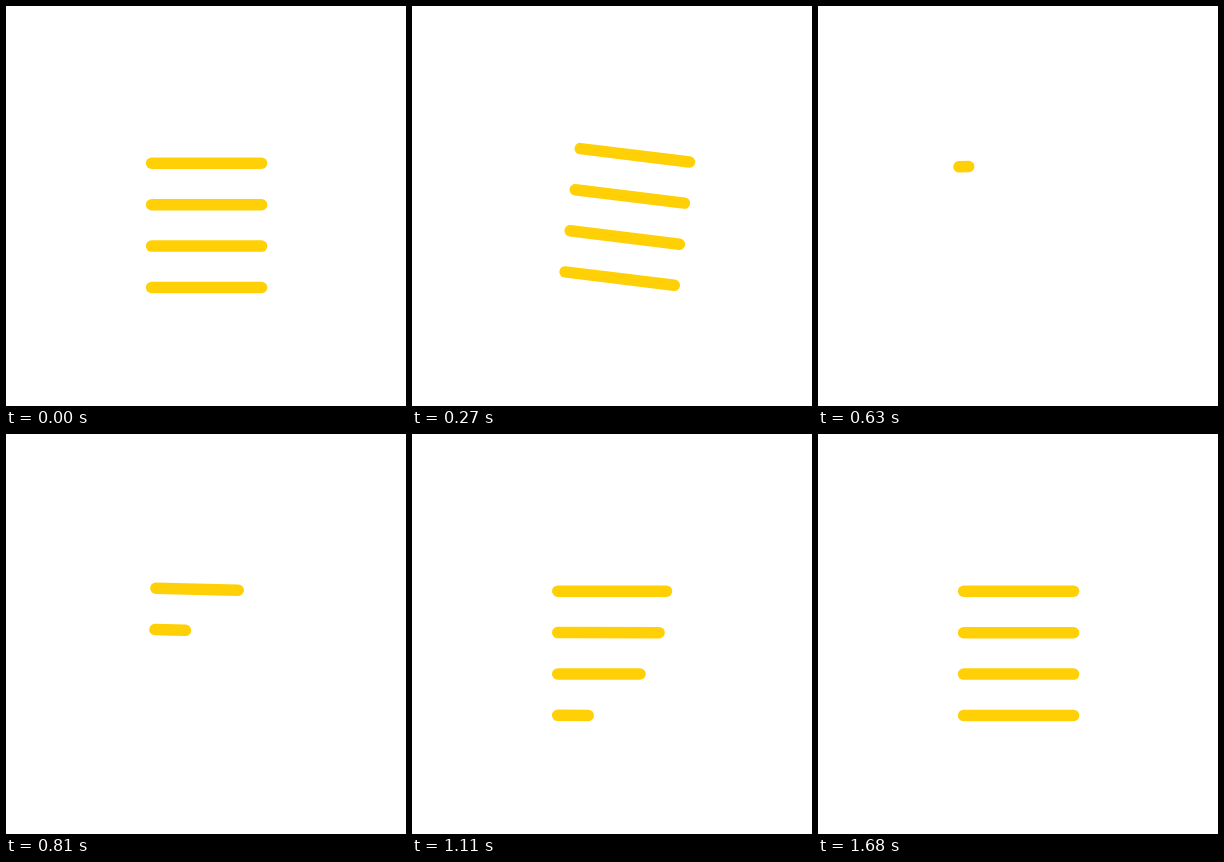
These frames come from a looping animation (400 by 400 pixels, 3.4 s). An HTML page:

```html
<!DOCTYPE html>
<html lang="en">
<head>
<meta charset="utf-8">
<title>Lines</title>
<style>
  html, body { margin: 0; width: 100%; height: 100%; overflow: hidden; background: #fff; }
  svg { display: block; width: 100%; height: 100%; }
  line { stroke: #ffd005; stroke-width: 11.5; stroke-linecap: round; }
  rect { fill: #fff; }
</style>
</head>
<body>
<svg viewBox="0 0 400 400"><g id="page"></g></svg>
<script>
const LOOP = 3400, STEP = 30;
const LEFT = 145.6, LENGTH = 110, CAP = 5.75, TOP = 157.3, PITCH = 41.4;
const PIVOT = "277 335";
const page = document.getElementById("page");

function add(tag, attrs) {
  const el = document.createElementNS("http://www.w3.org/2000/svg", tag);
  set(el, attrs);
  return page.appendChild(el);
}
function set(el, attrs) {
  for (const k in attrs) el.setAttribute(k, attrs[k]);
}

const lines = [0, 1, 2, 3].map(i => {
  const y = TOP + i * PITCH;
  return add("line", { x1: LEFT, y1: y, y2: y });
});
// Each wiper clears two lines from right to left.
const wipers = [0, 1].map(i =>
  add("rect", { y: TOP - 10 + i * 2 * PITCH, height: PITCH + 20 }));

const span = (t, a, b) => Math.min(1, Math.max(0, (t - a) / (b - a)));
const sine = p => (1 - Math.cos(Math.PI * p)) / 2;
const quadOut = p => 1 - (1 - p) * (1 - p);

// Cubic bezier easing (.11, 0, .03, 1), solved by bisection.
function grow(p) {
  if (p <= 0 || p >= 1) return p;
  let lo = 0, hi = 1, s;
  for (let i = 0; i < 24; i++) {
    s = (lo + hi) / 2;
    const r = 1 - s;
    const x = 3 * r * r * s * 0.11 + 3 * r * s * s * 0.03 + s * s * s;
    if (x < p) lo = s; else hi = s;
  }
  return s * s * (3 - 2 * s);
}

function tilt(t) {
  return 7 * quadOut(span(t, 0, 240))
    - 8.5 * sine(span(t, 320, 470))
    + 3.35 * sine(span(t, 625, 870))
    - 1.85 * sine(span(t, 870, 1140));
}

function draw(t) {
  const writing = t >= 480;
  set(page, { transform: `rotate(${tilt(t)} ${PIVOT})` });
  lines.forEach((line, i) => {
    const start = 600 + i * 150;
    const k = writing ? grow(span(t, start, start + 615)) : 1;
    set(line, { x2: LEFT + LENGTH * k, visibility: k > 0 ? "visible" : "hidden" });
  });
  wipers.forEach((wiper, i) => {
    const k = writing ? 0 : sine(i ? span(t, 390, 480) : span(t, 270, 450));
    const width = (LENGTH + 2 * CAP) * k;
    set(wiper, { x: LEFT + LENGTH + CAP - width, width: width ? width + 4 : 0 });
  });
}

function frame() {
  const t = performance.now() % LOOP;
  draw(Math.floor(t / STEP) * STEP);
  requestAnimationFrame(frame);
}
frame();
</script>
</body>
</html>
```
